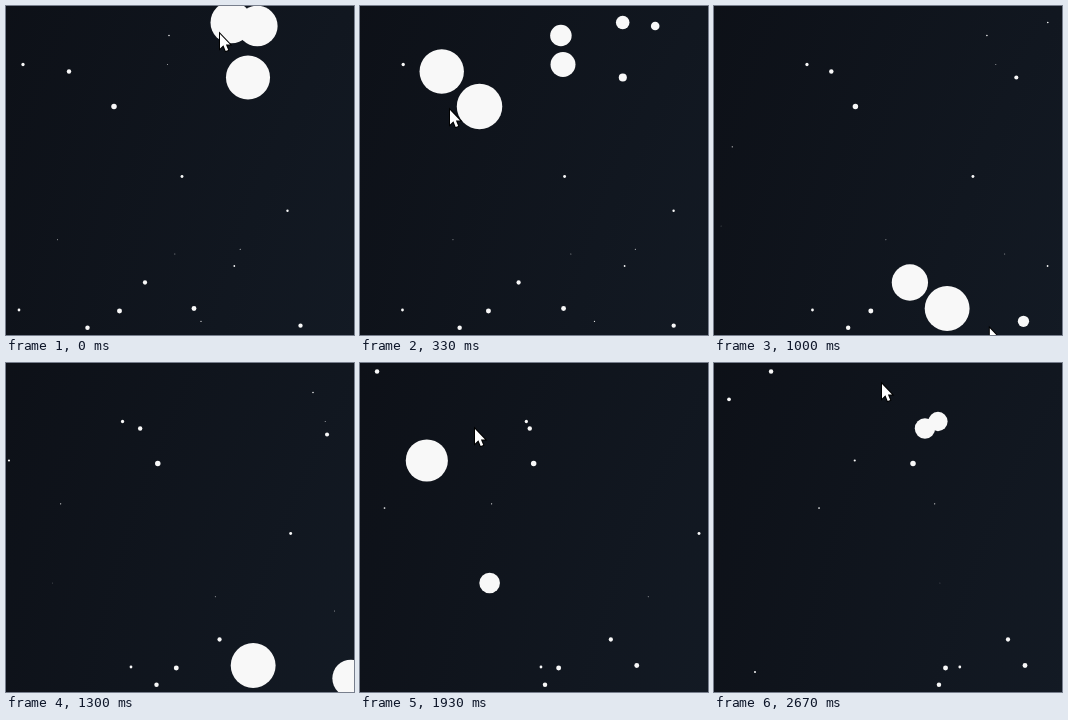
Animation, 348 px wide and 329 px high, one loop 2.71 s. Source, as an HTML page with a canvas:

```html
<!DOCTYPE html>
<html lang="en">
<head>
<meta charset="utf-8">
<title>Drifting dots</title>
<style>
  html, body { margin: 0; width: 100%; height: 100%; overflow: hidden; background: #0f151d; }
  canvas { display: block; }
</style>
</head>
<body>
<canvas id="stage" width="348" height="329"></canvas>
<script>
const W = 348, H = 329, LOOP = 2710;
const REACH = 56, GROW = 5, SHRINK = 2, SWELL = 20, FIRST = -8;
const ctx = document.getElementById('stage').getContext('2d');

// Start x, y and speed; slower dots are larger
const dots = [
  [17, 58.5, 2.62], [63, 65.5, 1.873], [108, 100.5, 1.152], [176, 170.5, 2.86],
  [139, 276.5, 1.962], [188, 302.5, 1.557], [113.5, 305, 1.494], [81.5, 321.7, 1.816],
  [13, 304, 2.947], [281.5, 204.8, 3.21], [228.3, 260, 3.63], [195, 315.3, 3.947],
  [294.5, 319.7, 1.92], [163, 29.5, 3.79], [161.5, 58.5, 4.15], [242, 71.5, 2.08],
  [225.3, 16.5, 3.74], [251.3, 20, 4.39], [-124.7, 97.5, 3.36], [-119.9, 220, 4.378],
  [-86.7, 8.5, 1.82], [-184.1, 145, 3.66], [-235.5, 309, 3.5], [-166.7, 36.3, 2.3]
].map(([x, y, speed]) => ({ x, y, speed }));

// Faint specks that do not react to the pointer
let seed = 7;
const random = () => (seed = (seed * 16807) % 2147483647) / 2147483647;
const dust = Array.from({ length: 5 }, () => ({
  x: 350 - random() * 550, y: 90 + random() * 210, speed: 3.9 + random() * 0.4
}));

// Key points of the pointer: step, x, y
const path = [
  [FIRST, 258, 28], [0, 214, 27], [2, 199, 31], [5, 133, 52], [10, 90, 103],
  [14, 112, 156], [19, 134, 204], [30, 290, 333], [42, 290, 333], [45, 178, 368],
  [50, 92, 194], [53, 84, 125], [57, 115, 65], [62, 168, 20], [90, 168, 20]
];

const arrow = [[0, 0], [0, 14.5], [3.4, 11.3], [5.7, 17], [8.2, 16], [5.9, 10.4], [10, 10.4]];

function pointerAt(step) {
  const i = path.findIndex(p => p[0] > step);
  const [s0, x0, y0] = path[i - 1], [s1, x1, y1] = path[i];
  const k = (step - s0) / (s1 - s0);
  return [x0 + (x1 - x0) * k, y0 + (y1 - y0) * k];
}

const xAt = (dot, step) => dot.x + dot.speed * step;

// Dots near the pointer's last position grow, all others shrink back
function swellAt(dot, step) {
  let swell = 0;
  for (let s = FIRST + 1; s <= step; s++) {
    const [px, py] = pointerAt(s - 1);
    const near = Math.hypot(xAt(dot, s) - px, dot.y - py) < REACH;
    swell = near ? Math.min(SWELL, swell + GROW) : Math.max(0, swell - SHRINK);
  }
  return swell;
}

function drawDot(dot, step, swell) {
  const x = xAt(dot, step);
  if (x < 0) return;
  ctx.beginPath();
  ctx.arc(x, dot.y, (4.8 - dot.speed) * 0.75 + swell, 0, Math.PI * 2);
  ctx.fill();
}

function drawSky() {
  const glow = ctx.createRadialGradient(0, 0, 0, 0, 0, 1);
  glow.addColorStop(0, '#1b2735');
  glow.addColorStop(1, '#090a0f');
  ctx.save();
  ctx.translate(900, 600);
  ctx.scale(1300, 1700);
  ctx.fillStyle = glow;
  ctx.fillRect(-1, -1, 2, 2);
  ctx.restore();
}

function drawPointer(step) {
  const [px, py] = pointerAt(step);
  ctx.beginPath();
  for (const [x, y] of arrow) ctx.lineTo(px + x, py + y + 1);
  ctx.closePath();
  ctx.strokeStyle = '#000';
  ctx.lineWidth = 2;
  ctx.stroke();
  ctx.fillStyle = '#fff';
  ctx.fill();
}

// 30 ticks a second, with one short stall that costs a tick
function stepAt(t) {
  const tick = Math.min(80, Math.floor((t / 10 + 0.5) * 0.3));
  if (tick < 25) return tick;
  return tick < 30 ? 24 : tick - 1;
}

function draw() {
  const step = stepAt(performance.now() % LOOP);
  drawSky();
  ctx.fillStyle = '#f8f8f8';
  for (const speck of dust) drawDot(speck, step, 0);
  for (const dot of dots) drawDot(dot, step, swellAt(dot, step));
  drawPointer(step);
  requestAnimationFrame(draw);
}
draw();
</script>
</body>
</html>
```
